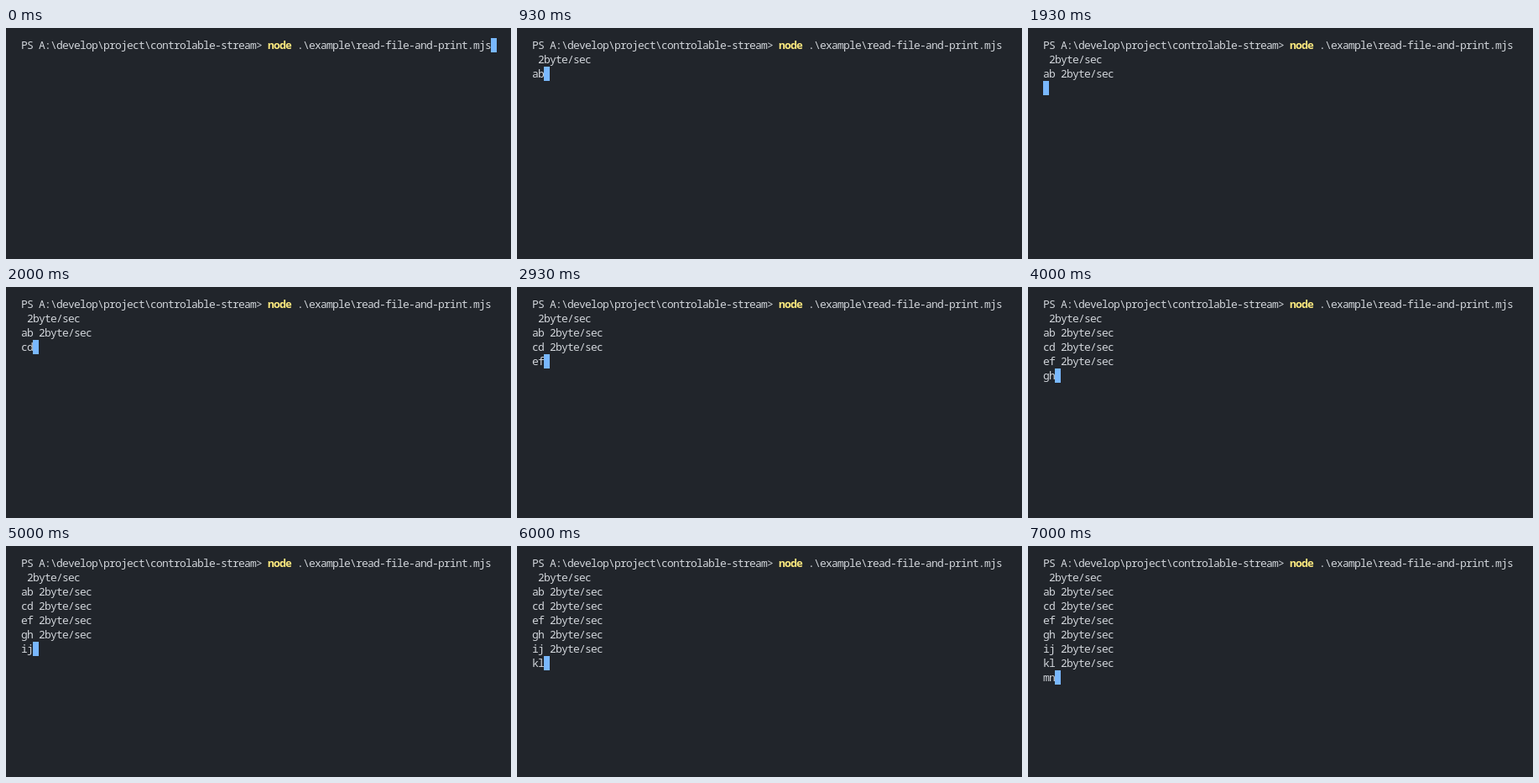
Write an HTML page with a canvas that moves like this. It is 602x275 px and loops after 8 s.

```html
<!DOCTYPE html>
<html lang="en">
<head>
<meta charset="utf-8">
<title>Terminal</title>
<style>
  html, body { margin: 0; width: 100%; height: 100%; overflow: hidden; background: #21252b; }
  canvas { display: block; }
</style>
</head>
<body>
<canvas id="screen" width="602" height="275"></canvas>
<script>
const ctx = document.getElementById('screen').getContext('2d');

const LOOP = 8000;
const LEFT = 18, TOP = 12, CELL = 7, ROW = 17, BASELINE = 13;
const COLORS = { back: '#21252b', text: '#d1d5da', command: '#ffea7f', cursor: '#79b8ff' };
const FONT = '13px "Noto Sans Mono", "DejaVu Sans Mono", monospace';

const PROMPT = String.raw`PS A:\develop\project\controlable-stream> `;
const COMMAND = 'node';
const ARGS = String.raw` .\example\read-file-and-print.mjs`;

// Each tick logs the rate, then prints the next two bytes.
const RATE = ' 2byte/sec\n';
const BYTES = 'abcdefghijklmn';
const LOG_TIMES = [870, 1930, 2930, 3930, 5000, 6000, 7000];
const BYTE_TIMES = [930, 2000, 2930, 4000, 5000, 6000, 7000];

function outputAt(t) {
  let out = '';
  LOG_TIMES.forEach((time, i) => {
    if (t >= time) out += RATE;
    if (t >= BYTE_TIMES[i]) out += BYTES.slice(2 * i, 2 * i + 2);
  });
  return out;
}

function write(text, col, row, color = COLORS.text, weight = 'normal') {
  ctx.font = `${weight} ${FONT}`;
  ctx.letterSpacing = '0px';
  ctx.letterSpacing = `${CELL - ctx.measureText('M').width}px`;
  ctx.fillStyle = color;
  ctx.fillText(text, LEFT + col * CELL, TOP + row * ROW + BASELINE);
}

function drawCursor(col, row) {
  ctx.fillStyle = COLORS.cursor;
  ctx.fillRect(LEFT + col * CELL, TOP + row * ROW, CELL, ROW);
}

function draw(t) {
  ctx.fillStyle = COLORS.back;
  ctx.fillRect(0, 0, 602, 275);

  const argsCol = PROMPT.length + COMMAND.length;
  write(PROMPT, 0, 0);
  write(COMMAND, PROMPT.length, 0, COLORS.command, 'bold');
  write(ARGS, argsCol, 0);

  const out = outputAt(t);
  if (!out) {
    drawCursor(argsCol + ARGS.length, 0);
    return;
  }
  const lines = out.split('\n');
  lines.forEach((line, i) => write(line, 0, i + 1));
  drawCursor(lines[lines.length - 1].length, lines.length);
}

const start = performance.now();
function tick() {
  draw((performance.now() - start) % LOOP);
  requestAnimationFrame(tick);
}
tick();
</script>
</body>
</html>
```
